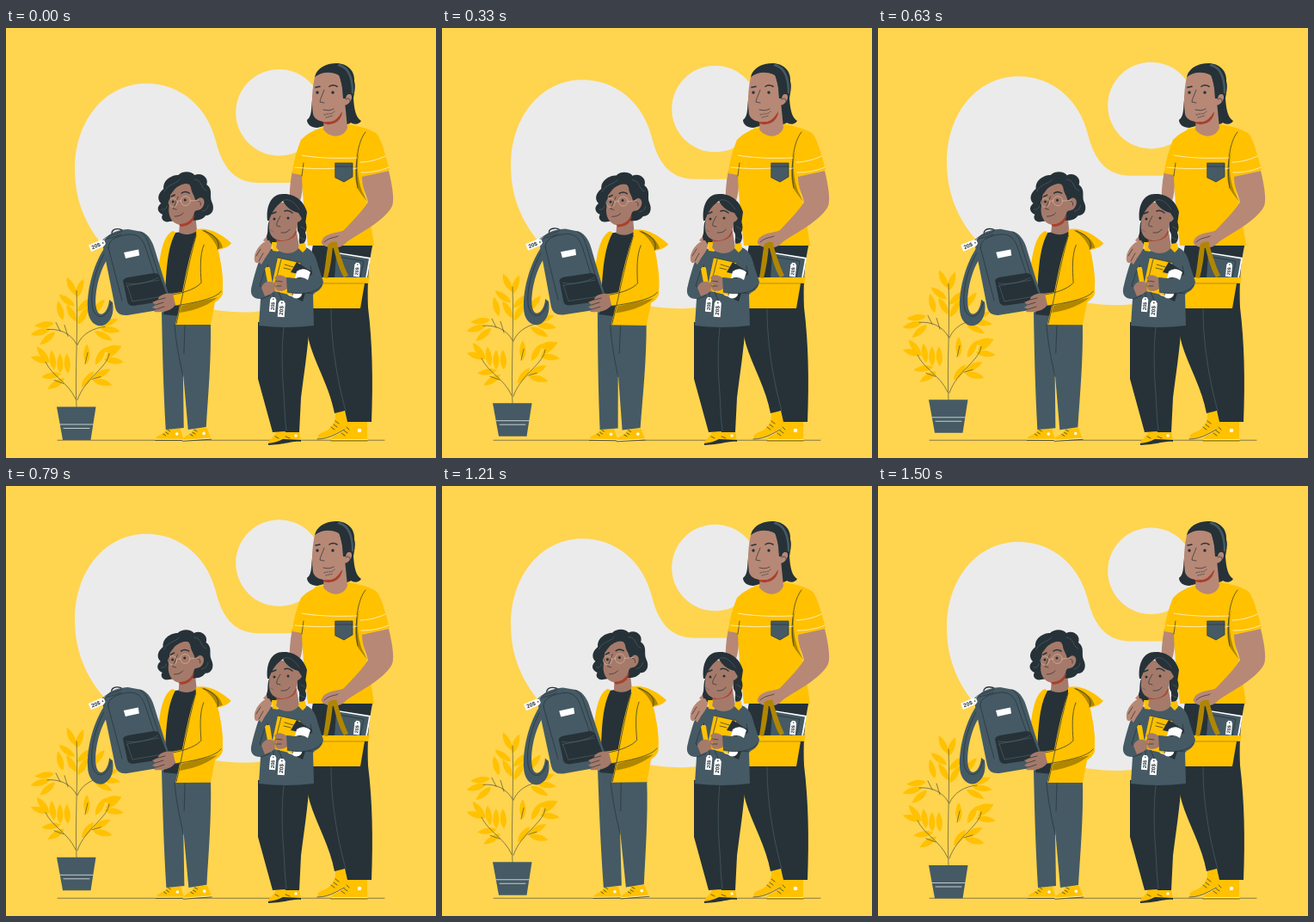
An HTML page that plays this animation: 500x500 px, repeating every 1540 ms.

```html
<!DOCTYPE html>
<html lang="en">
<head>
<meta charset="utf-8">
<title>Back to school shopping</title>
<style>
html, body { margin: 0; width: 100%; height: 100%; overflow: hidden; background: #ffd44f }
svg { display: block; width: 100%; height: 100% }
path { stroke-linecap: round; stroke-linejoin: round }
.y { fill: #ffc100 } .d { fill: #263238 } .s { fill: #455a64 } .o { fill: #b08600 }
.w { fill: #fff } .g { fill: #ebebeb } .r { fill: #a9402e }
.man { fill: #b78876 } .kid { fill: #a57a6a }
.l { fill: none; stroke: #263238; stroke-width: .7 }
.thin { stroke-width: .55 }
.brow { fill: none; stroke: #263238; stroke-width: 1.5 }
.lw { fill: none; stroke: #fff; stroke-width: .7 }
.ls { fill: none; stroke: #53666f; stroke-width: .6 }
text { font: bold 6.4px Arial, "Liberation Sans", sans-serif; fill: #263238; text-anchor: middle }
</style>
</head>
<body>
<svg viewBox="0 0 500 500">
<defs>
  <g id="tag">
    <path class="w" d="M-4 3L-2 0H2L4 3V19H-4Z"/>
    <circle class="d" cy="2.6" r=".8"/>
    <text transform="translate(2.2 11.5)rotate(-90)">20$</text>
  </g>
  <g id="shoe">
    <path class="y" d="M13 0H29C30 5 32 9 33 13H0C0 10 3 8 8 6Q12 4 13 0Z"/>
    <path class="lw" d="M0 12.3H33"/>
    <path class="l" d="M9 6L12 8M12 4L15 6M14 1L17 3M0 13.4H33"/>
    <circle class="w" cx="25" cy="6" r="1.8"/>
  </g>
</defs>

<g class="float g">
  <path d="M80 165C80 107 116 65 163 65C203 65 234 92 244 132C252 165 268 180.500 294 180.500H375C392 230 365 331 280 331C224 331 184 315 150 286C105 256 80 215 80 165Z"/>
  <circle cx="317.5" cy="98.8" r="50.3"/>
</g>
<path class="l thin" d="M60 479.300H440"/>

<g class="float">
  <g id="leaves" class="y"></g>
  <path class="l thin" d="M82 442C80 402 84 350 82 306M82 368C75 355 62 350 48 351M83 369C88 356 102 349 115 348M81 432C72 412 54 406 46 389M83 433C92 407 118 396 120 379M67 414L56 410M63 353L58 343M92 391L95 378M100 409L110 406M72 359L68 346"/>
  <path class="s" d="M59 441H104.500L98.500 479.500H66Z"/>
  <path class="lw" d="M63 461.500H101M67 466H97"/>
</g>

<g id="boy">
  <use href="#shoe" x="174" y="466"/>
  <use href="#shoe" transform="translate(205 467)rotate(-4)"/>
  <path class="s" d="M181 330L238 343C239 385 235 430 233 464L212 467L206 400L207 465L186 467C183 415 182 375 181 330Z"/>
  <path class="l" d="M196 345C198 370 203 390 206 405M208 346L207 378"/>
  <path class="y" d="M194 236C183 241 179 260 176 290L186 310L196 300L201 240Z"/>
  <path class="d" d="M197 238L224 234L222 290L202 335L183 333C187 300 184 262 197 238Z"/>
  <path class="kid" d="M202 222L220 218L222 236Q212 243 201 238Z"/>
  <path class="y" d="M221 234C234 231 249 238 262 250C257 256 249 257 246 258C251 275 252 295 252 308C250 315 245 317 243 319L238 345L197 345C205 313 208 280 221 240Z"/>
  <path class="o" d="M231 235C241 240 249 245 252 255L246 257C243 249 238 241 227 235Z"/>
  <path class="o" d="M204 323L246 313C237 321 222 328 202 331Z"/>
  <path class="y" d="M229 252C240 246 247 251 249 270C252 285 253 298 251 306C247 314 220 319 197 323L192 309C209 307 223 302 227 297Z"/>
  <path class="l" d="M221 241C210 281 205 316 198 344M194 310C212 307 223 301 227 296C226 281 225 264 230 252M197 323C222 319 245 314 250 306M230 236C243 240 250 249 246 257"/>

  <path class="d" d="M190 225C183 227 179 221 182 217C174 213 176 207 180 204C174 198 178 191 183 187C182 177 192 171 200 171C206 165 216 167 219 171C227 167 236 174 233 182C241 188 236 195 239 202C243 210 240 218 232 218C228 224 219 225 211 222Z"/>
  <path class="kid" d="M191 193C194 186 203 181 212 180L218 191L222 199C229 193 234 203 227 210C223 213 221 211 219 214C217 223 211 229 205 229C195 229 189 222 189 211Z"/>
  <path class="r" d="M201 228Q212 229 219 217Q218 230 203 231Z"/>
  <path class="d" d="M189 196C194 191 196 186 200 184C206 180 211 180 215 183C214 191 219 193 220 201L229 193L224 176L204 172L187 181Z"/>
  <path class="l" d="M200 196C197 202 196 207 194 210L198 211M196 219Q203 219 206 215M223 201Q227 201 226 206"/>
  <path class="brow" d="M192 196L196 194M204 192Q208 189 213 192"/>
  <circle class="d" cx="194" cy="202" r="1.500"/>
  <circle class="d" cx="208" cy="200" r="1.500"/>
  <path fill="none" stroke="#e4c0a8" stroke-width=".6" d="M189 203A4.800 5 0 1 0 199 203A4.800 5 0 1 0 189 203M203 201A5.500 5.500 0 1 0 214 201A5.500 5.500 0 1 0 203 201M199 202Q201 200 203 201M214 201L224 200"/>
  <path class="ls" d="M184 190C188 181 197 182 202 176M219 176C229 177 225 186 233 189M181 211Q186 212 187 207M228 213Q234 212 235 206"/>

  <path class="s" d="M117 252C102 272 94 304 95 326C95 342 106 350 115 345C122 341 126 332 124 319L120 316C119 332 108 339 105 326C102 311 108 284 117 270Z"/>
  <path class="l" d="M115 261C104 280 98 305 100 322C102 340 118 341 122 320"/>
  <path class="l" style="stroke-width:1.400" d="M123 240C121 232 136 232 137 238"/>
  <path class="s" d="M113 256C112 241 126 235 142 234L158 237C166 240 171 250 173 258L190 313Q192 325 183 327L141 334Q129 335 127 325Z"/>
  <path class="l" d="M119 256C118 245 133 241 144 240C155 240 159 247 162 255L177 300M119 256L135 317M156 237C163 241 165 248 167 255L186 313Q188 324 181 327"/>
  <path class="w" d="M137 261L154 257.500L155 264.500L139 268Z"/>
  <path class="d" d="M136 294Q137 291 142 290L172 285Q177 285 179 289L187 310Q187 317 181 318L148 323Q142 323 141 318Z"/>
  <path class="ls" d="M140 300L178 293M140 297C151 299 167 296 177 290M141 300L147 318L182 312"/>
  <path class="l" d="M111 249C117 243 121 246 134 240M111 248C119 239 126 242 135 236"/>
  <use href="#tag" transform="translate(115 249)rotate(67)"/>
  <path class="kid" d="M194 309C185 307 176 312 177 316L170 319L174 322L170 325L175 327L172 330C183 331 192 329 197 322Z"/>
  <path class="l" d="M174 322L183 319M175 327L184 324M177 316L185 314"/>
</g>

<g id="man">
  <path class="y" d="M383 447L393 445L397 457L398 464C387 468 377 477 363 477C361 472 367 471 373 468C380 464 384 456 383 447Z"/>
  <path class="l" d="M362 478C378 478 387 469 398 465M378 464L382 467M381 461L385 464M383 457L387 460"/>
  <path class="y" d="M396 457H420V480H378C377 475 384 474 389 471C394 468 397 464 396 457Z"/>
  <path class="l" d="M378 480H420M390 471L394 474M393 468L397 471M396 464L399 467"/>
  <path class="lw" d="M379 478.500H420"/>
  <circle class="w" cx="411" cy="468" r="2.300"/>
  <path class="d" d="M348 300L357 252L427 249C421 275 420 300 421 325C426 365 427 410 425 458H397L394 445L382 448C376 415 356 385 351 358Z"/>
  <path class="ls" d="M378 327C378 375 388 420 395 445"/>
  <path class="man" d="M333 166L346 168C345 190 344 205 334 215L308 252L299 247L330 210C329 195 330 180 333 166Z"/>
  <path class="y" d="M371 116C361 116 350 123 343 130C338 142 334 157 333 169L344 171C345 200 348 225 351 253H428C425 232 421 210 418 199L414 174L446 165C441 145 435 126 430 122C420 116 405 113 397 112Z"/>
  <path class="o" d="M411 144C407 158 409 177 414 190L421 203C417 198 412 192 409 187C404 173 406 156 411 144Z"/>
  <path class="man" d="M414 173L445 166C449 182 452 200 449 207C441 224 410 239 396 249C391 255 384 257 375 255C366 253 364 248 371 244C378 238 388 239 393 235C405 222 417 210 421 202C418 191 414 185 414 173Z"/>
  <path class="l" d="M418 121C408 133 405 162 409 186M344 172L346 157"/>
  <path class="lw" d="M344 148C360 151 382 152 408 151M336 162C357 164 371 164 383 163M403 164L408 163M412 156C422 156 433 153 441 149M413 168C425 168 436 166 445 162"/>
  <path class="s" d="M383 157H403V173L393 179L383 174Z"/>
  <path class="l" d="M383 161H403M383 157H403V173L393 179L383 174Z"/>

  <path class="d" d="M360 54C364 45 374 41 384 41C397 41 406 50 405 62C407 68 405 75 404 82C405 96 407 104 413 108C410 113 404 112 401 110C397 113 392 113 388 109L362 116C355 116 350 112 350 107C357 102 354 90 357 78Z"/>
  <path class="man" d="M370 102L394 86L397 116C393 128 377 129 369 118Z"/>
  <path class="r" d="M368 108C379 111 385 106 391 97C391 108 379 115 369 111Z"/>
  <path class="man" d="M359 57C364 50 377 48 387 53L394 80C401 72 406 81 398 88Q395 91 391 89C391 98 386 109 375 109C364 110 358 105 357 100C355 86 356 71 359 57Z"/>
  <path class="d" d="M359 57C362 47 371 42 383 42C395 42 402 51 402 61L400 77Q396 76 395 82L392 82C391 72 391 61 387 55C378 50 367 51 359 57Z"/>
  <path d="M387 43C398 46 403 58 403 75" fill="none" stroke="#455a64" stroke-width="2.500"/>
  <path class="l" d="M370 72C368 78 365 83 365 86L370 87M369 95Q376 97 381 94M395 83Q400 80 400 85"/>
  <path class="brow" d="M360 69L365 68M376 68Q380 65 385 68"/>
  <path class="l" stroke-dasharray="1.300 1.700" d="M370 101C375 99 379 101 382 97M372 104L380 102"/>
  <circle class="d" cx="362" cy="75" r="1.700"/>
  <circle class="d" cx="380" cy="75" r="1.700"/>

  <path class="d" d="M368 262L384 257L396 290H369Z"/>
  <path class="w" d="M386 261L424 267L420 291H389Z"/>
  <path class="s" d="M384 262L422 268.500L418 291H382Z"/>
  <path class="l" d="M386 266L416 271L412 291"/>
  <use href="#tag" transform="translate(409 273)rotate(6)scale(.85)"/>
  <path class="y" d="M349 290H423L421 297H417L412 326H356L350 297H347Z"/>
  <path class="l" opacity=".5" d="M349 297H421"/>
  <path class="o" d="M369 290C372 274 373 256 376 247L384 247C387 260 392 275 398 288L393 290C386 279 383 263 380 253C379 266 377 279 374 291Z"/>
  <path class="man" d="M369 244C374 239 386 237 393 236L395 249C388 251 382 247 377 250C371 253 365 250 369 244Z"/>
  <path class="l" d="M370 249C376 243 383 244 386 242"/>
</g>

<g id="girl">
  <path class="y" d="M314 469L326 470L329 480C320 479 315 484 305 483C305 478 312 477 314 469Z"/>
  <path class="y" d="M326 469H341L343 480C336 477 330 481 320 482C316 479 326 477 326 469Z"/>
  <path class="d" d="M305 483Q315 482 322 478L343 479V481C332 480 328 484 305 485Z"/>
  <path class="l" d="M313 475L317 477M325 475L330 477"/>
  <circle class="w" cx="337" cy="474" r="1.700"/>
  <path class="d" d="M293 342H353C351 375 346 405 343 430L341 470H325L322 423L325 469L310 470L293 408Z"/>
  <path class="ls" d="M323 348C320 375 321 402 323 425C324 440 324 455 326 468"/>
  <path class="s" d="M307 256C321 262 333 260 344 254C356 256 360 264 363 277L369 295C368 304 361 307 357 309L358 346Q325 350 294 346L296 315C286 315 283 309 286 299C291 280 296 259 307 256Z"/>
  <path class="l" d="M302 278L295 300L302 304M354 277L357 293M297 315L307 311M340 307L358 309"/>
  <path class="d" d="M309 220C302 227 306 236 303 242C304 252 309 253 315 250L317 230ZM337 214C348 220 352 230 348 238C351 245 347 251 343 253C338 248 344 242 339 236Z"/>
  <path class="kid" d="M315 242L337 231L341 255C335 264 321 264 314 256Z"/>
  <path class="r" d="M314 245Q329 246 338 235Q337 248 316 248Z"/>
  <path class="kid" d="M308 206C317 199 332 203 338 214C346 212 347 223 339 226C338 239 332 247 321 247C309 247 305 238 306 228Z"/>
  <path class="d" d="M304 224C302 206 309 193 322 193C336 192 347 202 350 214L348 228L340 215C331 213 325 207 322 201C315 206 309 213 306 224Z"/>
  <path class="ls" d="M322 201C328 197 335 202 341 211M306 234L311 237M343 231L348 234M341 243L347 246"/>
  <path class="y" d="M309 249L315 249L314 255L317 260L310 259ZM341 251L348 250L349 257L345 261L340 256Z"/>
  <path class="l" d="M319 219C316 224 314 228 315 230L319 231M320 238Q327 239 330 234"/>
  <path class="brow" d="M309 216L314 214M324 213Q328 211 333 215"/>
  <circle class="d" cx="312" cy="222" r="1.500"/>
  <circle class="d" cx="328" cy="221" r="1.500"/>

  <path class="man" d="M306 247C299 247 290 257 289 266C288 272 291 275 294 272L297 275L301 268C306 261 309 257 309 252Z"/>
  <path class="l" d="M294 271L299 262M291 265L296 257"/>
  <path class="d" d="M336 274L356 283L345 318L326 309Z"/>
  <path class="w" d="M326 306L344 305C346 311 341 316 335 314C331 310 327 313 326 306Z"/>
  <path class="y" d="M316 267L343 273L333 311L308 305Z"/>
  <path class="l" d="M316 267L343 273L333 311M320 269L311 305M324 275L334 278M323 279L331 281"/>
  <path class="d" d="M338 272L350 280L344 287L331 284Z"/>
  <path class="y" d="M301 280L304 276L307 279L311 305L306 306Z"/>
  <path class="d" d="M303 278L304 275L305.500 278Z"/>
  <path class="kid" d="M297 302C299 296 305 293 310 296L315 298L311 302L315 304L308 309L301 312ZM327 291C319 285 314 287 312 291L316 294L310 296L315 299L312 303C317 308 326 306 330 300Z"/>
  <path class="s" d="M326 290C337 291 346 293 356 287L368 294C367 306 348 312 327 307Z"/>
  <path class="w" d="M338 283Q346 277 354 284L351 293Q345 288 336 291Z"/>
  <path class="l" d="M314 294L321 295M313 300L320 300M327 307C343 311 362 308 367 299M311 308L311 316M317 307L322 319"/>
  <use href="#tag" transform="translate(311 313)rotate(5)scale(.9)"/>
  <use href="#tag" transform="translate(321 317)rotate(4)"/>
</g>
</svg>
<script>
const LOOP = 1540, LEAD = 40;
// Each leaf: base x, base y, angle
const leaves = `82 314 -70, 81 311 -116, 80 324 -143, 83 330 -42, 66 340 -104, 82 342 -120, 84 345 -60, 100 334 -50,
  56 344 173, 51 351 165, 57 354 140, 109 347 -20, 110 350 8, 103 353 28,
  51 389 -164, 50 389 -128, 56 398 -98, 63 402 -90, 72 402 -93, 64 403 172, 68 408 148,
  94 391 -90, 104 392 -60, 112 376 -12, 114 386 8, 116 384 -38, 101 408 -28, 101 410 14, 88 418 -52`;
document.getElementById('leaves').innerHTML = leaves.split(',').map(leaf => {
  const [x, y, angle] = leaf.trim().split(' ');
  return `<path transform="translate(${x} ${y})rotate(${angle})" d="M0 0C6 -5 16 -5 23 0C16 4 6 5 0 0Z"/>`;
}).join('');

const floating = document.querySelectorAll('.float');
const boy = document.getElementById('boy');

function draw() {
  const phase = (performance.now() + LEAD) / LOOP % 1 * 2 * Math.PI;
  const lift = -10 * Math.acos(Math.cos(phase)) / Math.PI;      // linear up and down
  const tilt = Math.asin(Math.sin(phase)) * 2 / Math.PI;        // linear sway of one degree
  floating.forEach(part => part.setAttribute('transform', `translate(0 ${lift})`));
  boy.setAttribute('transform', `rotate(${tilt} 178 324)`);
  requestAnimationFrame(draw);
}
draw();
</script>
</body>
</html>
```
